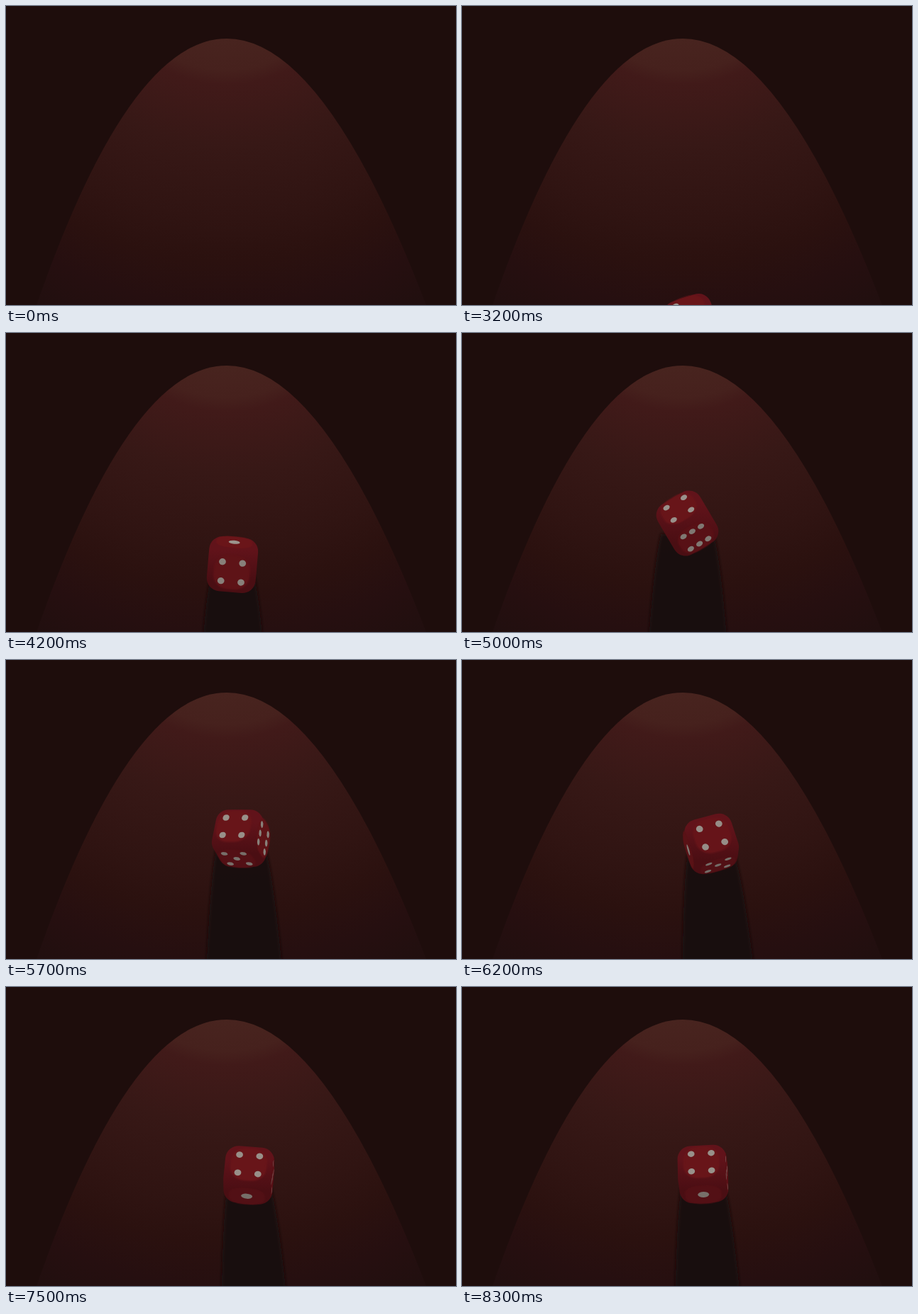
Animation of 634x422 px, one loop 8.4 s. Source, as an HTML page:

```html
<!DOCTYPE html>
<html lang="en">
<head>
<meta charset="utf-8">
<title>Rolling die</title>
<style>
  html, body { margin: 0; width: 100%; height: 100%; overflow: hidden; background: #1e0d0c; }
  svg { display: block; width: 634px; height: 422px; }
</style>
</head>
<body>
<svg viewBox="0 0 634 422">
  <defs>
    <radialGradient id="glow" gradientUnits="userSpaceOnUse" cx="311" cy="-80" r="570">
      <stop offset=".22" stop-color="#48241f"/>
      <stop offset=".3" stop-color="#46211d"/>
      <stop offset=".335" stop-color="#411a19"/>
      <stop offset=".49" stop-color="#371816"/>
      <stop offset=".667" stop-color="#301412"/>
      <stop offset=".772" stop-color="#2b110f"/>
      <stop offset=".88" stop-color="#260f10"/>
      <stop offset="1" stop-color="#210f0f"/>
    </radialGradient>
    <linearGradient id="shell" x2="0" y2="1">
      <stop offset="0" stop-color="#61131a"/>
      <stop offset="1" stop-color="#4a0e13"/>
    </linearGradient>
    <filter id="soft"><feGaussianBlur stdDeviation="2"/></filter>
  </defs>
  <rect width="634" height="422" fill="#1e0d0c"/>
  <path d="M43 422Q304.5 -330 592 422Z" fill="url(#glow)"/>
  <g id="scene">
    <path id="shadow" fill="#1a0b0c" fill-opacity=".93" filter="url(#soft)"/>
    <path id="body" fill="url(#shell)" stroke="url(#shell)" stroke-width="37" stroke-linejoin="round"/>
    <g id="faces"></g>
  </g>
</svg>
<script>
const LOOP = 8400, START = 3200, STEP = 100;
const CORE = 16, ROUND = 18.5, HALF = 33.5, PIP_GAP = 14.2;
const LIGHT = { x: 315, y: -365 };

// time, centre x, centre y, normal of the four, normal of the six (z points at the viewer)
const KEYS = [
  [3200, 325, 451, .22, .67, -.71, -.22, -.67, -.71],
  [3700, 321, 382, .13, .96, .24, .03, .24, -.97],
  [4200, 319, 327, -.03, .31, .95, -.08, .95, -.31],
  [5000, 317.5, 268.5, -.36, -.61, .7, .36, .61, .7],
  [5700, 331, 251.5, -.3, -.5, .81, .95, 0, .35],
  [6700, 365, 269, .32, -.22, .92, .76, -.53, -.39],
  [7600, 340, 265, -.04, -.47, .88, .03, -.88, -.47],
  [8300, 339.5, 264, -.07, -.5, .86, -.02, -.86, -.5]
];

const CORNERS = [[-1, -1], [1, -1], [1, 1], [-1, 1]];
const DIAGONAL = [[-1, -1], [1, 1]];
const CENTRE = [[0, 0]];
// axis: 0 = six, 1 = five, 2 = four; the opposite faces have sign -1
const FACES = [
  { axis: 0, sign: 1, pips: [...CORNERS, [0, -1], [0, 1]] },
  { axis: 0, sign: -1, pips: CENTRE },
  { axis: 1, sign: 1, pips: [...CORNERS, ...CENTRE] },
  { axis: 1, sign: -1, pips: DIAGONAL },
  { axis: 2, sign: 1, pips: CORNERS },
  { axis: 2, sign: -1, pips: [...DIAGONAL, ...CENTRE] }
];

const byId = id => document.getElementById(id);
const scene = byId('scene'), shadow = byId('shadow'), body = byId('body');

function add(parent, tag, attrs = {}) {
  const node = document.createElementNS('http://www.w3.org/2000/svg', tag);
  for (const name in attrs) node.setAttribute(name, attrs[name]);
  return parent.appendChild(node);
}

for (const face of FACES) {
  face.group = add(byId('faces'), 'g');
  face.plate = add(face.group, 'rect', {
    x: -25, y: -25, width: 50, height: 50, rx: 20, 'stroke-width': 4, 'stroke-opacity': .4
  });
  face.dots = add(face.group, 'g');
  const r = face.pips.length === 1 ? 8 : 4.9;
  for (const [u, v] of face.pips) add(face.dots, 'circle', { cx: u * PIP_GAP, cy: v * PIP_GAP, r });
}

const dot = (a, b) => a[0] * b[0] + a[1] * b[1] + a[2] * b[2];
const scale = (a, k) => a.map(n => n * k);
const unit = a => scale(a, 1 / Math.sqrt(dot(a, a)));
const cross = (a, b) => [
  a[1] * b[2] - a[2] * b[1], a[2] * b[0] - a[0] * b[2], a[0] * b[1] - a[1] * b[0]
];
const mix = (a, b, k) => `rgb(${a.map((n, i) => Math.round(n + (b[i] - n) * k))})`;

// Smooth curve through the keys
function poseAt(t) {
  let i = 0;
  while (i < KEYS.length - 2 && t >= KEYS[i + 1][0]) i++;
  const a = KEYS[i], b = KEYS[i + 1];
  const before = KEYS[Math.max(i - 1, 0)], after = KEYS[Math.min(i + 2, KEYS.length - 1)];
  const span = b[0] - a[0], s = (t - a[0]) / span, s2 = s * s, s3 = s2 * s;
  const p = a.map((n, k) => {
    const m0 = (b[k] - before[k]) / (b[0] - before[0]) * span;
    const m1 = (after[k] - n) / (after[0] - a[0]) * span;
    return (2 * s3 - 3 * s2 + 1) * n + (s3 - 2 * s2 + s) * m0
      + (3 * s2 - 2 * s3) * b[k] + (s3 - s2) * m1;
  });
  const four = unit(p.slice(3, 6)), raw = p.slice(6, 9), lean = dot(four, raw);
  const six = unit(raw.map((n, k) => n - four[k] * lean));
  return { x: p[1], y: p[2], axes: [six, cross(four, six), four] };
}

function drawShadow(x, y, axes) {
  const w = CORE * axes.reduce((sum, a) => sum + Math.abs(a[0]), 0) + ROUND;
  const ray = (px, py) => {
    const k = (py - LIGHT.y) / (y - LIGHT.y);
    return `${LIGHT.x + (px - LIGHT.x) * k} ${py}`;
  };
  const top = y + 15, mid = y + 60, end = 436 + Math.max(0, y - 340);
  shadow.setAttribute('d', `M${x - w * .85} ${top}Q${ray(x - w, mid)} ${ray(x - w, end)}` +
    `L${ray(x + w, end)}Q${ray(x + w, mid)} ${x + w * .85} ${top}Z`);
}

function drawDie(x, y, axes) {
  let outline = '';
  for (const face of FACES) {
    const n = scale(axes[face.axis], face.sign);
    const u = axes[(face.axis + 1) % 3], v = axes[(face.axis + 2) % 3];
    const quad = CORNERS.map(([a, b]) =>
      [0, 1].map(k => ((k ? y : x) + CORE * (n[k] + a * u[k] + b * v[k])).toFixed(2)).join(' '));
    outline += `M${quad.join('L')}Z`;

    const visible = n[2] > .02;
    face.group.style.display = visible ? '' : 'none';
    if (!visible) continue;
    face.group.setAttribute('transform',
      `matrix(${[u[0], u[1], v[0], v[1], x + HALF * n[0], y + HALF * n[1]].map(c => c.toFixed(4))})`);
    const light = Math.min(1, Math.max(0, .45 - .4 * n[1] + .2 * n[2]));
    const red = mix([76, 15, 20], [110, 22, 26], light);
    face.plate.setAttribute('fill', red);
    face.plate.setAttribute('stroke', red);
    face.dots.setAttribute('fill', mix([108, 101, 96], [162, 154, 147], light));
  }
  body.setAttribute('d', outline);
}

function render(now) {
  const t = Math.floor(now % LOOP / STEP) * STEP;
  scene.style.display = t < START ? 'none' : '';
  if (t >= START) {
    const { x, y, axes } = poseAt(t);
    drawShadow(x, y, axes);
    drawDie(x, y, axes);
  }
}

const began = performance.now();
function tick() {
  render(performance.now() - began);
  requestAnimationFrame(tick);
}
tick();
</script>
</body>
</html>
```
